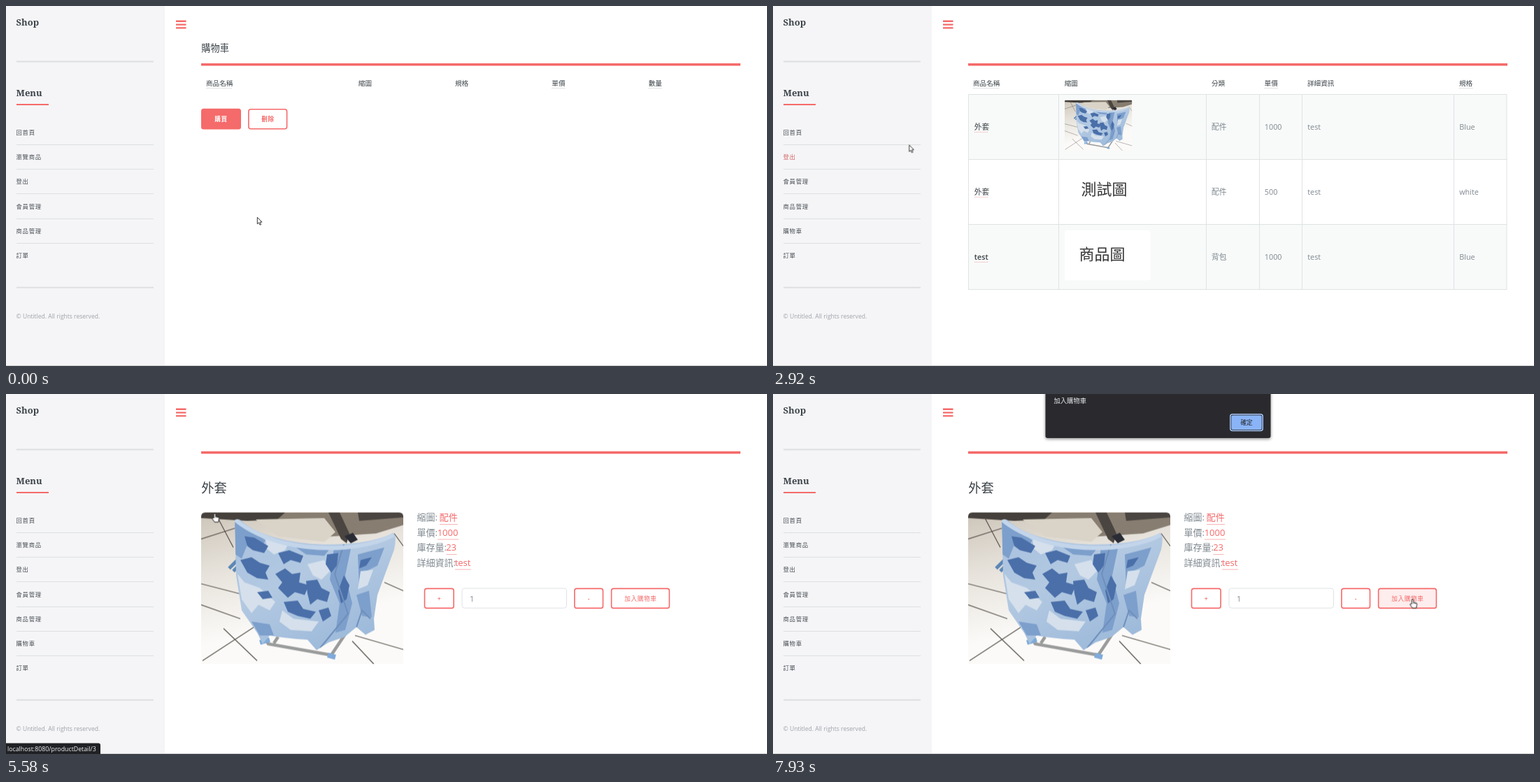
Write an HTML page that moves like this. It is 1088x515 px and loops after 8 s.

```html
<!DOCTYPE html>
<html lang="zh-Hant">
<head>
<meta charset="utf-8">
<title>Shop</title>
<style>
html, body { margin: 0; width: 100%; height: 100%; overflow: hidden; background: #fff; }
svg { display: block; width: 1088px; height: 515px; }
text { font-family: "Open Sans", "Noto Sans CJK TC", "Noto Sans CJK", sans-serif; white-space: pre; }

.slab { font: 700 13px "Noto Serif", serif; fill: #3d4449; }
.item { font-size: 8.4px; letter-spacing: .65px; fill: #4a5055; }
.copy { font-size: 8.56px; fill: #a0a3a8; }
.title { font-size: 13.2px; fill: #3d4449; }
.name { font-size: 18.2px; fill: #3d4449; }
.head { font-size: 9.6px; font-weight: 500; fill: #3d4449; }
.cell { font-size: 10.8px; fill: #7f888f; }
.link { fill: #3d4449; }
.strong { font-weight: 600; }
.sample { font-size: 22px; fill: #333; }
.info { font-size: 13px; fill: #7f888f; }
.red { fill: #f56a6a; }
.btn { font-size: 8.6px; font-weight: 600; letter-spacing: .65px; text-anchor: middle; fill: #f56a6a; }
.btn.plain { font-weight: 400; }
.btn.white { fill: #fff; }
.tip { font-size: 8.8px; fill: #f1f3f4; }
.rule { stroke: #dddfe1; }
.thick { stroke: #dedfe1; stroke-width: 2; }
.box { fill: #f56a6a; fill-opacity: 0; stroke: #f56a6a; stroke-width: 1.6; }
.dots { stroke: #f29a9a; stroke-width: .9; stroke-dasharray: 1 1; }
.grey { stroke: #b9bec2; }
.solid { stroke: #f8b4b4; }
.under { stroke: #f56a6a; stroke-width: .7; }

.cart, .list, .detail, .arrow, .hand, .beam { animation: 8s step-end infinite; }
.tip1, .tip2, .dialog, .cursor, .hot1, .hot2, .hot3, .minus, .add { animation: 8s linear infinite; }
.cart { animation-name: cart; }
.list { animation-name: list; }
.detail { animation-name: detail; }
.arrow { animation-name: arrow; }
.hand { animation-name: hand; }
.beam { animation-name: beam; }
.tip1 { animation-name: tip1; }
.tip2 { animation-name: tip2; }
.dialog { animation-name: dialog; }
.cursor { animation-name: cursor; }
.hot1 { animation-name: hot1; }
.hot2 { animation-name: hot2; }
.hot3 { animation-name: hot3; }
.minus { animation-name: minus; }
.add { animation-name: add; }

@keyframes cart { 0% { opacity: 1 } 30.5%, 100% { opacity: 0 } }
@keyframes list { 0% { opacity: 0 } 30.5% { opacity: 1 } 69.75%, 100% { opacity: 0 } }
@keyframes detail { 0% { opacity: 0 } 69.75%, 100% { opacity: 1 } }

@keyframes cursor {
  0%, 5.8% { transform: translate(359px, 302px) }
  10% { transform: translate(308px, 272px) }
  15.25%, 16% { transform: translate(256px, 246px) }
  18.75% { transform: translate(165px, 226px) }
  21.25% { transform: translate(90px, 214px) }
  25.5% { transform: translate(77px, 213px) }
  28%, 31.2% { transform: translate(72px, 212.5px) }
  36.5% { transform: translate(194px, 198.5px) }
  39.9% { transform: translate(310px, 200px) }
  40.9% { transform: translate(326px, 196px) }
  45% { transform: translate(303px, 174px) }
  50.6%, 70.5% { transform: translate(298.5px, 170.5px) }
  77.4% { transform: translate(646px, 265.5px) }
  79.9% { transform: translate(700px, 288px) }
  83.8% { transform: translate(850px, 302px) }
  87.5%, 100% { transform: translate(914.5px, 293.5px) }
}
@keyframes arrow {
  0% { opacity: 1 } 17.5% { opacity: 0 } 36.2% { opacity: 1 } 45.6% { opacity: 0 }
  71.2% { opacity: 1 } 79% { opacity: 0 } 82.5% { opacity: 1 } 84.3%, 100% { opacity: 0 }
}
@keyframes hand {
  0% { opacity: 0 } 17.5% { opacity: 1 } 36.2% { opacity: 0 } 45.6% { opacity: 1 }
  71.2% { opacity: 0 } 84.3%, 100% { opacity: 1 }
}
@keyframes beam { 0% { opacity: 0 } 79% { opacity: 1 } 82.5%, 100% { opacity: 0 } }

@keyframes tip1 { 0%, 22.9% { opacity: 0 } 25%, 34% { opacity: 1 } 36%, 100% { opacity: 0 } }
@keyframes tip2 { 0%, 49% { opacity: 0 } 51.4%, 71.5% { opacity: 1 } 74%, 100% { opacity: 0 } }
@keyframes hot1 { 0%, 18.1% { fill: #4a5055 } 20.6%, 100% { fill: #f56a6a } }
@keyframes hot2 { 0%, 30.5% { fill: #4a5055 } 33%, 36% { fill: #f56a6a } 38.5%, 100% { fill: #4a5055 } }
@keyframes hot3 { 0%, 45.6% { fill: #3d4449 } 48.1%, 100% { fill: #f56a6a } }
@keyframes minus { 0%, 83% { fill-opacity: 0 } 84% { fill-opacity: .06 } 86.5%, 100% { fill-opacity: 0 } }
@keyframes add {
  0%, 84.3% { fill-opacity: 0 } 86.8%, 95% { fill-opacity: .1 }
  96% { fill-opacity: .2 } 98.5%, 100% { fill-opacity: .12 }
}
@keyframes dialog { 0%, 95.8% { opacity: 0 } 98.5%, 100% { opacity: 1 } }
</style>
</head>
<body>
<svg viewBox="0 0 1088 515">
  <defs>
    <filter id="shadow" x="-10%" y="-20%" width="120%" height="150%">
      <feDropShadow dx="0" dy="1.5" stdDeviation="2" flood-opacity=".45"/>
    </filter>
    <linearGradient id="floor" x2=".3" y2="1">
      <stop stop-color="#cdc5b9"/><stop offset=".4" stop-color="#e8e4dd"/><stop offset=".8" stop-color="#fbfaf8"/>
    </linearGradient>
    <linearGradient id="denim" x2=".5" y2="1">
      <stop stop-color="#a5bfde"/><stop offset=".5" stop-color="#b3c9e2"/><stop offset="1" stop-color="#9cb9da"/>
    </linearGradient>
    <clipPath id="frame"><path d="M0 217V6Q0 0 6 0H283Q289 0 289 6V217Z"/></clipPath>
    <clipPath id="cloth">
      <path d="M48 11Q54 7 61 15C90 38 150 49 206 45Q250 42 275 29Q280 34 276 53L252 118L247 152L248 168L235 175L222 164L205 178L182 186L165 197L152 182Q120 180 98 176L88 188L80 172L58 140L50 90Z"/>
    </clipPath>
    <symbol id="photo" viewBox="0 0 289 217">
      <g clip-path="url(#frame)">
        <path fill="url(#floor)" d="M0 0H289V217H0Z"/>
        <path fill="#45403b" d="M0 0H128L118 10L66 12L0 8Z"/>
        <path fill="#877d70" d="M120 0H289V18L250 30L160 36L100 18Z"/>
        <path fill="#d9d3c8" d="M78 10L176 8L192 28L176 42L110 34Z"/>
        <path fill="#4a4541" d="M182 0H198L212 30L208 44L200 38ZM224 0H289V7L226 12Z"/>
        <path fill="none" stroke="#57514b" stroke-width="1.2" d="M0 38L50 22M24 8L46 50M0 102L62 118M0 132L56 152M32 166L80 212M77 163L2 212M216 184L247 217M220 176L289 196M262 100L289 112M276 30L289 48"/>
        <path fill="none" stroke="#5b86b5" stroke-width="5" d="M56 64L40 80M54 76L46 84"/>
        <path fill="none" stroke="#9a9b9b" stroke-width="4.5" d="M86 174L96 188L186 204L208 171M104 187L110 178"/>
        <path stroke="#7faada" stroke-width="7" d="M84 186L98 182M181 204L192 207"/>
        <g clip-path="url(#cloth)">
          <path fill="url(#denim)" d="M40 0H289V217H40Z"/>
          <path fill="#7d9fcc" d="M48 12L64 20L92 40L84 52L66 46L58 66L49 60ZM190 50L214 52L206 90L216 130L206 168L192 172L198 130L184 96ZM224 60L262 50L252 76L236 84L226 110ZM130 46L184 52L176 62L150 60ZM72 156L98 160L104 176L84 176ZM222 118L240 112L244 150L230 148Z"/>
          <path fill="#d5e0ec" d="M52 88L62 100L84 108L106 128L98 140L82 132L72 144L58 124ZM92 38L124 46L120 54L104 60L94 52ZM152 74L176 68L184 84L172 96L160 90ZM116 140L132 152L168 156L158 170L128 168L112 156ZM228 84L246 82L238 104L224 110Z"/>
          <path fill="#4a6fa9" d="M62 34L76 36L96 48L90 58L74 54L66 48ZM56 68L72 64L84 72L98 76L92 86L96 96L80 94L66 86ZM110 58L126 54L146 62L142 72L128 68L118 74ZM106 88L120 80L130 88L142 86L140 100L154 104L148 118L134 114L124 122L110 108L116 100ZM150 98L166 96L172 108L184 114L180 128L166 124L156 132L152 116ZM118 128L138 126L146 138L164 142L156 152L138 148L124 142ZM180 60L196 58L194 76L186 86L178 74ZM204 90L212 104L208 124L200 130L196 112ZM228 68L244 64L236 76L226 80ZM80 114L96 112L102 122L88 124ZM168 140L182 136L186 148L174 156Z"/>
          <path fill="none" stroke="#6f8fbb" stroke-width="2" d="M204 46L191 88L210 145L170 194M222 164L230 140L242 152"/>
          <path fill="none" stroke="#c3d5ea" stroke-width="6" d="M48 10C90 44 150 54 206 50Q250 46 275 32"/>
        </g>
        <path fill="#292c35" d="M205 34L217 29L224 39L214 44Z"/>
      </g>
    </symbol>
  </defs>

  <rect width="227" height="515" fill="#f5f5f7"/>
  <text class="slab" x="14.5" y="28">Shop</text>
  <path class="thick" d="M15 79.5H211"/>
  <text class="slab" x="14.5" y="129">Menu</text>
  <path stroke="#f56a6a" stroke-width="1.8" d="M15 141H61"/>
  <path stroke="#f56a6a" stroke-width="2.4" d="M243 21.8H257.5M243 26.6H257.5M243 31.4H257.5"/>
  <path stroke="#f56a6a" stroke-width="3.5" d="M279 83.8H1050"/>
  <g class="cart" id="cart"></g>
  <g class="list" id="list"></g>
  <g class="detail" id="detail"></g>
  <path stroke="#cdcdcd" d="M0 514.5H1088"/>

  <g class="tip1">
    <path fill="#202124" d="M0 499.5H99Q102 499.5 102 502.5V515H0Z"/>
    <text class="tip" x="2" y="510.5">localhost:8080/product</text>
  </g>
  <g class="tip2">
    <path fill="#202124" d="M0 499.5H132Q135 499.5 135 502.5V515H0Z"/>
    <text class="tip" x="2" y="510.5">localhost:8080/productDetail/3</text>
  </g>

  <g class="dialog">
    <rect x="389.5" y="-10" width="322" height="73" rx="3" fill="#292a2d" filter="url(#shadow)"/>
    <text x="401.5" y="13.3" font-size="9.3" fill="#e8eaed">加入購物車</text>
    <rect x="653.8" y="29" width="46.4" height="23.4" rx="3" fill="#202124" stroke="#a9c8fa" stroke-width="1.5"/>
    <rect x="655.3" y="30.4" width="43.4" height="20.6" rx="2" fill="#8ab4f8"/>
    <text x="677" y="44" font-size="8.6" fill="#202124" text-anchor="middle">確定</text>
  </g>

  <g class="cursor" stroke="#222" stroke-linejoin="round">
    <path class="arrow" fill="#fff" stroke-width=".9" d="M.3.3V9.8L2.5 7.8L4 11.2L5.6 10.5L4.1 7.1H7Z"/>
    <g class="hand">
      <path fill="#fff" d="M-1.2 7V1Q0-.9 1.2 1V4.7L5 5.5Q6.3 5.9 6.2 7.3L5.2 12.8H-.2L-3.6 8Q-3.8 6.3-2.2 6.6Z"/>
      <path fill="none" stroke-width=".6" d="M1.2 4.7V6.6M3.1 5.1V6.8M4.8 5.5V7"/>
    </g>
    <path class="beam" fill="none" stroke-width=".9" d="M-2-6H2M0-6V6M-2 6H2"/>
  </g>
</svg>
<script>
const $ = id => document.getElementById(id);
const text = (x, y, s, cls) => `<text class="${cls}" x="${x}" y="${y}">${s}</text>`;
const line = (x, y, w, cls) => `<path class="${cls}" d="M${x} ${y}h${w}"/>`;
const photo = (x, y, w) => `<use href="#photo" x="${x}" y="${y}" width="${w}" height="${w * 217 / 289}"/>`;
const button = (x, y, w, s, boxCls = '', textCls = '') =>
  `<rect class="box ${boxCls}" x="${x}" y="${y}" width="${w}" height="28" rx="3"/>` +
  text(x + w / 2 + .3, y + 17.4, s, 'btn ' + textCls);

function menu(items, hot, cls) {
  const rows = items.map((s, i) => {
    const y = 184.2 + i * 35.1;
    const rule = i < items.length - 1 ? line(15, Math.round(y + 14) + .5, 196, 'rule') : '';
    return text(14.6, y, s, 'item ' + (i === hot ? cls : '')) + rule;
  });
  const end = 402.7 + (items.length - 6) * 35;
  return rows.join('') + line(15, end, 196, 'thick') +
    text(14.6, end + 44.4, '© Untitled. All rights reserved.', 'copy');
}

// A trailing underscore marks a sortable, underlined column.
const heads = cols => cols.map(([x, s]) => {
  const label = s.replace('_', '');
  return text(x, 114.2, label, 'head') +
    (label !== s ? line(x, 117.6, label.length * 9.5, 'dots grey') : '');
}).join('');

function table() {
  const rows = [
    ['外套', '配件', '1000', 'Blue'],
    ['外套', '配件', '500', 'white'],
    ['test', '背包', '1000', 'Blue']
  ];
  const cells = rows.map(([name, kind, price, spec], i) => {
    const y = 126.5 + i * 93, base = y + 50.3;
    const cls = 'cell link ' + (i === 0 ? 'hot3' : i === 2 ? 'strong' : '');
    return `<rect x="279.5" y="${y}" width="769.5" height="93" fill="${i % 2 ? '#fff' : '#f8faf9'}" stroke="#dfe3e4"/>` +
      text(287.8, base, name, cls) + line(288, base + 3.6, 20, 'dots') +
      text(627, base, kind, 'cell') + text(702.8, base, price, 'cell') +
      text(764.3, base, 'test', 'cell') + text(981.2, base, spec, 'cell');
  }).join('');
  return cells + '<path stroke="#dfe3e4" d="' +
    [408.5, 619.5, 695.5, 756.5, 973.5].map(x => `M${x} 126.5V405.5`).join('') + '"/>';
}

const info = [
  ['縮圖: ', '配件', 620, 26], ['單價:', '1000', 617, 30],
  ['庫存量:', '23', 629.5, 15], ['詳細資訊:', 'test', 642, 23]
].map(([label, value, x, w], i) => {
  const y = 181.3 + i * 21.5;
  return text(587.5, y, label, 'info') + text(x - .3, y, value, 'info red') + line(x, y + 5.2, w, 'solid');
}).join('');

$('cart').innerHTML =
  menu(['回首頁', '瀏覽商品', '登出', '會員管理', '商品管理', '訂單'], 1, 'hot1') +
  line(15, 221, 36.5, 'under tip1') +
  text(279.3, 64.5, '購物車', 'title') +
  heads([[286, '商品名稱_'], [503.8, '縮圖'], [642, '規格'], [780.3, '單價_'], [918.7, '數量_']]) +
  '<rect x="279" y="146.8" width="57" height="29.8" rx="3.5" fill="#f56a6a"/>' +
  text(307.5, 164.5, '購買', 'btn white') +
  button(346.9, 147.7, 54.7, '刪除');

$('list').innerHTML =
  menu(['回首頁', '登出', '會員管理', '商品管理', '購物車', '訂單'], 1, 'hot2') +
  heads([[286, '商品名稱_'], [416.7, '縮圖'], [627, '分類'], [702.6, '單價_'], [764, '詳細資訊'], [981, '規格_']]) +
  table() + photo(417, 134.5, 96.5) +
  text(440.5, 269.5, '測試圖', 'sample') +
  '<rect x="417" y="321" width="122.5" height="71.5" rx="3.5" fill="#fff"/>' +
  text(437.5, 362.5, '商品圖', 'sample');

$('detail').innerHTML =
  menu(['回首頁', '瀏覽商品', '登出', '會員管理', '商品管理', '購物車', '訂單']) +
  text(279.3, 140.5, '外套', 'name') + photo(279, 169.5, 289) + info +
  button(598.5, 278.4, 41.6, '+') +
  '<rect x="652" y="278" width="149.5" height="28.2" rx="3.5" fill="#fff" stroke="#dfe2e4"/>' +
  text(663, 296.8, '1', 'cell') +
  button(812.9, 278.4, 40.6, '-', 'minus') +
  button(865.6, 278.4, 82.8, '加入購物車', 'add', 'plain');
</script>
</body>
</html>
```
